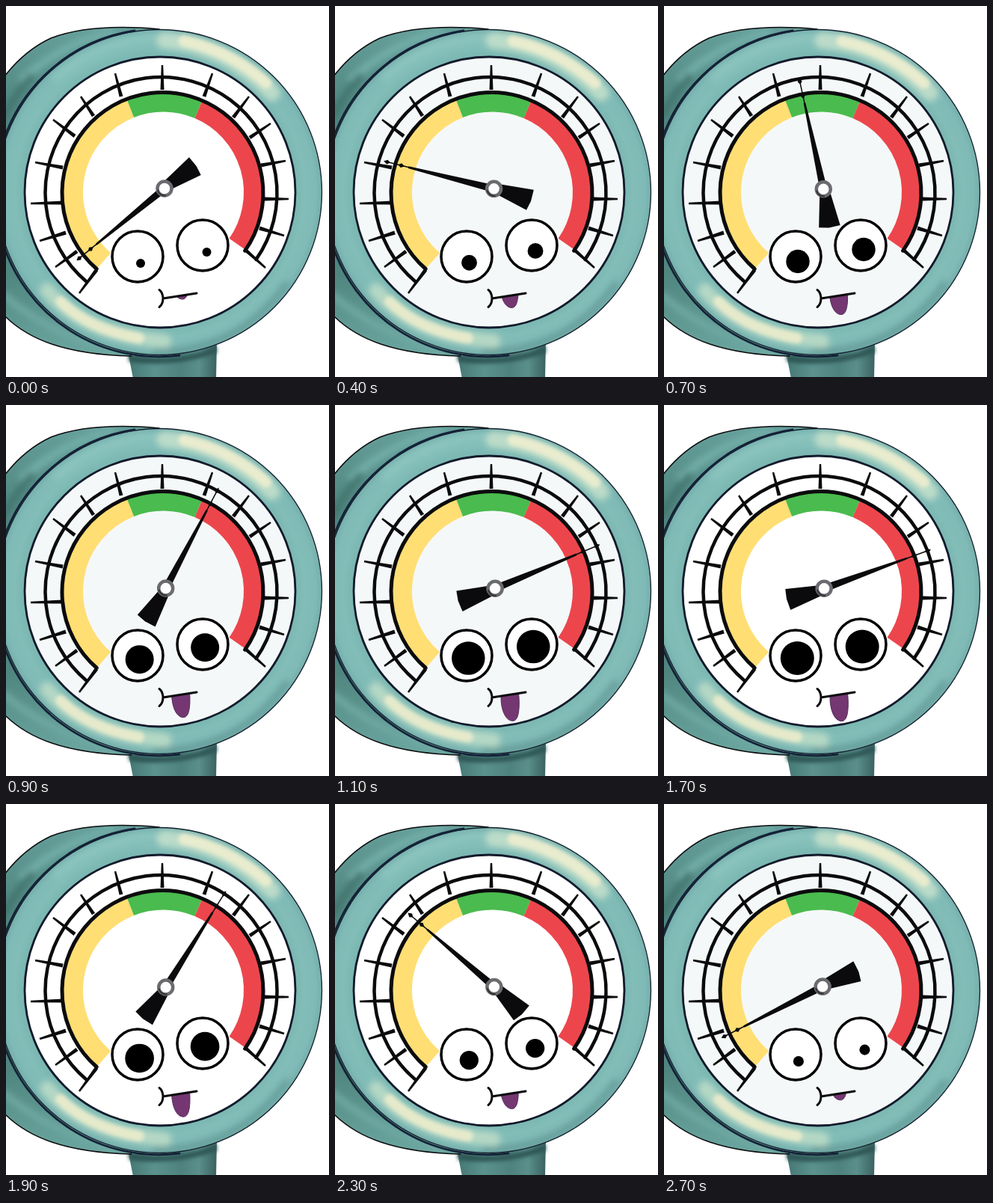
An HTML page that plays this animation: 432 px wide and 496 px high, repeating every 2.8 s.

```html
<!DOCTYPE html>
<html lang="en">
<head>
<meta charset="utf-8">
<title>Gauge</title>
<style>
  html, body { margin: 0; width: 100%; height: 100%; overflow: hidden; background: #fff; }
  svg { display: block; width: 432px; height: 496px; }
  .line { fill: none; stroke: #0b0b0d; stroke-linecap: round; stroke-linejoin: round; }
</style>
</head>
<body>
<svg viewBox="0 0 432 496">
  <defs>
    <linearGradient id="stemFill">
      <stop offset="0" stop-color="#457774"/>
      <stop offset=".3" stop-color="#5b928e"/>
      <stop offset=".6" stop-color="#4e827f"/>
      <stop offset=".8" stop-color="#5a8f8b"/>
      <stop offset="1" stop-color="#3a6260"/>
    </linearGradient>
    <linearGradient id="backFill" x1="0" y1="0" x2="0" y2="1">
      <stop offset="0" stop-color="#669f9b"/>
      <stop offset=".25" stop-color="#50867f"/>
      <stop offset=".75" stop-color="#50867f"/>
      <stop offset="1" stop-color="#6ba6a0"/>
    </linearGradient>
    <radialGradient id="rimFill" gradientUnits="userSpaceOnUse" cx="205" cy="249" r="218">
      <stop offset=".82" stop-color="#79b5b0"/>
      <stop offset=".89" stop-color="#82bdb8"/>
      <stop offset=".96" stop-color="#80bab6"/>
      <stop offset="1" stop-color="#74aeab"/>
    </radialGradient>
    <filter id="soft" x="-30%" y="-30%" width="160%" height="160%"><feGaussianBlur stdDeviation="4"/></filter>
    <filter id="fine" x="-30%" y="-30%" width="160%" height="160%"><feGaussianBlur stdDeviation="2.500"/></filter>
    <clipPath id="rimClip"><circle cx="205" cy="249" r="217.500"/></clipPath>
    <clipPath id="backClip"><path id="backShape" d="M205 31C150 26 100 28 60 43C32 56 12 76-2 94V414C30 446 80 466 168 468L230 468Z"/></clipPath>
    <clipPath id="mouthClip"><path d="M205 392L260 383.500V440H205Z"/></clipPath>
  </defs>

  <path d="M163 462L170 498H281L282 450Z" fill="url(#stemFill)"/>
  <path d="M163 466Q225 478 282 455V464Q225 484 165 476Z" fill="#2f5654" filter="url(#fine)"/>
  <use href="#backShape" fill="url(#backFill)"/>
  <g clip-path="url(#backClip)" fill="none" filter="url(#soft)">
    <path d="M20 100Q70 52 145 33" stroke="#72ada8" stroke-width="11"/>
    <path d="M-5 150Q15 115 36 92" stroke="#43756f" stroke-width="10"/>
    <path d="M-5 385Q50 434 145 463" stroke="#6fa9a3" stroke-width="9"/>
  </g>
  <path class="line" d="M205 31C150 26 100 28 60 43C32 56 12 76-2 94M-2 414C30 446 80 466 168 468" stroke-width="1.500"/>

  <circle cx="205" cy="249" r="217.500" fill="url(#rimFill)"/>
  <g clip-path="url(#rimClip)" fill="none" stroke-linecap="round">
    <g filter="url(#soft)">
      <path d="M68 95Q120 50 195 43" stroke="#8bc4be" stroke-width="12"/>
      <path d="M200 462Q310 462 375 372" stroke="#639b98" stroke-width="8"/>
      <path d="M212 46Q292 52 356 116" stroke="#bcdcc9" stroke-width="22"/>
      <path d="M55 380Q105 440 212 448" stroke="#b5d8c5" stroke-width="19"/>
    </g>
    <g filter="url(#fine)">
      <path d="M238 47Q300 60 348 103" stroke="#e9ecce" stroke-width="15"/>
      <path d="M73 395Q112 433 178 444" stroke="#e6eacb" stroke-width="14"/>
    </g>
  </g>
  <circle class="line" cx="205" cy="249" r="217.500" stroke-width="1.300" style="stroke:#14202d"/>
  <path class="line" d="M172 33A219 219 0 0 0-5 185M-5 315A219 219 0 0 0 232 467" stroke-width="2.800" style="stroke:#142238"/>

  <circle id="face" cx="206" cy="249" r="181" fill="#fff" stroke="#121a2b" stroke-width="2.800"/>
  <g id="bands" fill="none" stroke-width="27"></g>
  <g id="scale" class="line"></g>
  <g id="ticks" fill="#0b0b0d"></g>

  <g id="needle">
    <path d="M-5 0L-1.300-118H1.300L5 0Z" fill="#0b0b0d"/>
    <path class="line" d="M0-112V-149" stroke-width="1.500"/>
    <path d="M0-132L3-128L0-123L-3-128ZM0-152L3-147L0-143L-3-147Z" fill="#0b0b0d"/>
    <path d="M-7 8L-17 49L-4 52L11.500 52L8 8Z" fill="#0b0b0d"/>
  </g>
  <g id="hub">
    <circle r="9.500" fill="#fff" stroke="#6b6b6f" stroke-width="4.500"/>
    <path class="line" d="M-9 2.500A9.500 9.500 0 0 0 1 9.500" stroke-width="2" style="stroke:#333336"/>
  </g>

  <g fill="#fff" stroke="#000" stroke-width="3.500">
    <circle cx="176" cy="335" r="34"/>
    <circle cx="263" cy="320" r="34"/>
  </g>
  <circle id="left"/>
  <circle id="right"/>
  <g clip-path="url(#mouthClip)">
    <path id="tongue" d="M-15-50L-14.500-26C-13-10-7 0 1 0C8 0 10-12 9.500-28L8-50Z" fill="#743772" stroke="#4f2855"/>
  </g>
  <path class="line" d="M210 391L255 384M205 379.500Q209 382 210 390Q210 399 205 402.500" stroke-width="3"/>
</svg>
<script>
const $ = id => document.getElementById(id);

function add(parent, d, attrs) {
  const p = document.createElementNS('http://www.w3.org/2000/svg', 'path');
  p.setAttribute('d', d);
  for (const k in attrs) p.setAttribute(k, attrs[k]);
  $(parent).append(p);
}

// Angles in degrees, clockwise from the top.
function arc(cx, cy, r, from, to) {
  const at = a => {
    const q = a * Math.PI / 180;
    return `${cx + r * Math.sin(q)} ${cy - r * Math.cos(q)}`;
  };
  return `M${at(from)}A${r} ${r} 0 ${to - from > 180 ? 1 : 0} 1 ${at(to)}`;
}

// Hand-drawn stroke that thickens from start to end.
function wedge(x1, y1, x2, y2) {
  const len = Math.hypot(x2 - x1, y2 - y1);
  const nx = (y1 - y2) / len, ny = (x2 - x1) / len;
  const p = (x, y, w) => `${x + nx * w} ${y + ny * w}`;
  return `M${p(x1, y1, 1.2)}L${p(x2, y2, 2.5)}L${p(x2, y2, -2.5)}L${p(x1, y1, -1.2)}Z`;
}

[['#ffde74', -139, -21.5], ['#4abb4e', -21.5, 23], ['#ec464c', 23, 125]].forEach(
  ([stroke, from, to]) => add('bands', arc(210.5, 249, 121, from, to), { stroke }));
add('scale', arc(207.5, 250, 155, -140, 125), { 'stroke-width': 4.5 });
add('scale', arc(209.5, 250, 134.5, -139, 125), { 'stroke-width': 5 });

const ticks = [
  [209, 79, 209, 112], [146, 90, 154, 121], [100, 121, 117, 147], [63, 152, 92, 174],
  [39, 209, 76, 216], [33, 264, 76, 263], [45, 314, 80, 303], [66, 349, 95, 328],
  [98, 384, 121, 353], [276, 90, 265, 121], [325, 121, 304, 149], [354, 157, 326, 176],
  [374, 207, 341, 213], [378, 258, 346, 258], [372, 307, 339, 297], [347, 350, 319, 325]
];
ticks.forEach(t => add('ticks', wedge(...t)));

// Needle swing: [step, angle], joined by smooth curves.
const STEP = 100, COUNT = 28;
const swing = [
  [0, -129.3], [7, -12.4], [11, 67.3], [14, 108], [15, 104],
  [19, 32], [23, -49.4], [27, -116.9], [28, -129.3]
];

function slope(i) {
  const a = swing[i - 1], b = swing[i], c = swing[i + 1];
  if (!a || !c || (b[1] - a[1]) * (c[1] - b[1]) <= 0) return 0;
  return (c[1] - a[1]) / (c[0] - a[0]);
}

function angleAt(n) {
  const i = swing.findIndex((k, j) => j && n < k[0]) - 1;
  const [x0, y0] = swing[i], [x1, y1] = swing[i + 1];
  const w = x1 - x0, u = (n - x0) / w, v = 1 - u;
  return y0 * v * v * (1 + 2 * u) + y1 * u * u * (3 - 2 * u)
    + w * u * v * (slope(i) * v - slope(i + 1) * u);
}

function pupil(id, x, y, r) {
  const e = $(id);
  e.setAttribute('cx', x);
  e.setAttribute('cy', y);
  e.setAttribute('r', r);
}

function draw(now) {
  const n = Math.floor(now / STEP) % COUNT;
  const angle = angleAt(n);
  const q = Math.max(0, (angle + 129.3) / 233.3);
  const r = 6 + 19.3 * q;
  const pivot = `translate(${212 + 2.5 * q} ${244 + 1.5 * q})`;
  $('hub').setAttribute('transform', pivot);
  $('needle').setAttribute('transform', `${pivot} rotate(${angle})`);
  pupil('left', 180 - 2 * q, 344 - 7 * q ** 1.5, r);
  pupil('right', 268.5 - 4.2 * q ** 1.5, 329 - 7 * q, r);
  $('tongue').setAttribute('transform', `translate(${235 + 2 * q} ${392 + 34.5 * q ** 0.75})`);
  $('face').setAttribute('fill', n > 3 && n < 13 || n > 25 ? '#f5f8f8' : '#fff');
  requestAnimationFrame(() => draw(performance.now() - start));
}

const start = performance.now();
draw(0);
</script>
</body>
</html>
```
